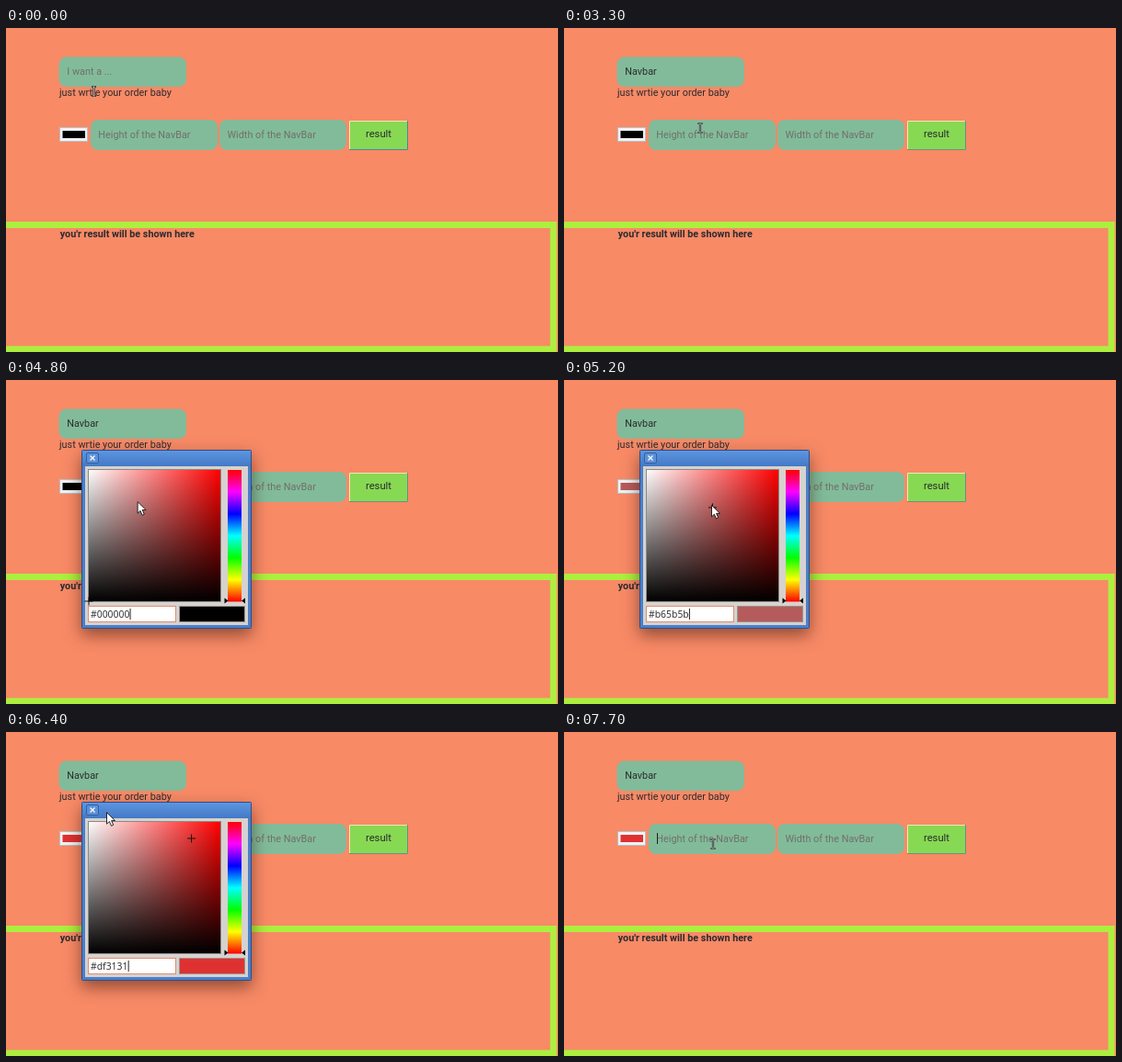
Animation, 600 px wide and 353 px high, one loop 8 s. Source, as an HTML page:

```html
<!DOCTYPE html>
<html lang="en">
<head>
<meta charset="utf-8">
<title>Order form</title>
<style>
  html, body { margin: 0; width: 100%; height: 100%; overflow: hidden; background: #f88a66; }
  svg { display: block; width: 600px; height: 353px; }
  text { font: 10.85px Roboto, sans-serif; fill: #2b2b30; white-space: pre; }
  .hint { fill: #70706a; }
  .field { fill: #82bb9a; }
  .caret { stroke: #222; stroke-width: 1; }
  #hex { font: 10.4px "Noto Sans", sans-serif; fill: #333; }
  #dialog { transform-origin: 174.5px 173.5px; }
  .shadow { filter: drop-shadow(0 7px 9px rgba(40, 10, 0, .5)); }
</style>
</head>
<body>
<svg viewBox="0 0 600 353">
  <defs>
    <linearGradient id="bar" x2="0" y2="1"><stop stop-color="#5e95e0"/><stop offset="1" stop-color="#4379c6"/></linearGradient>
    <linearGradient id="sat"><stop stop-color="#fff"/><stop offset="1" stop-color="#f00"/></linearGradient>
    <linearGradient id="val" x2="0" y2="1"><stop stop-opacity="0"/><stop offset="1"/></linearGradient>
    <linearGradient id="hue" x2="0" y2="1"></linearGradient>
  </defs>
  <rect width="600" height="353" fill="#f88a66"/>
  <rect x="-10" y="214.5" width="605" height="135.5" fill="none" stroke="#adef3f" stroke-width="7"/>

  <rect class="field" x="57.5" y="31.5" width="138.5" height="32.5" rx="8"/>
  <rect class="field" x="92" y="100" width="138" height="33" rx="8"/>
  <rect class="field" x="232" y="100" width="138" height="33" rx="8"/>
  <text id="order" x="66.3" y="51"></text>
  <path id="orderCaret" class="caret"/>
  <text x="58" y="74">just wrtie your order baby</text>
  <text class="hint" x="100.3" y="119.5">Height of the NavBar</text>
  <text class="hint" x="240.5" y="119.5">Width of the NavBar</text>
  <path id="heightCaret" class="caret" d="M101.5 110v12"/>

  <rect x="58.5" y="108.5" width="30" height="15" fill="#f0f1f3" stroke="#b9bfc4"/>
  <rect class="picked" x="61.5" y="112" width="24.5" height="8"/>

  <rect x="373" y="101" width="64" height="32" fill="#87d953"/>
  <path d="M373.5 133V101.5H437" fill="none" stroke="#f3e7b8"/>
  <path d="M373 132.5H436.5V101" fill="none" stroke="#6c8f87"/>
  <path id="focus" d="M374 132.5H436.5V101" fill="none" stroke="#3d6fd0" stroke-dasharray="1 1"/>
  <text x="391" y="119" style="font-size:11.2px">result</text>
  <text x="58.7" y="228" style="font-size:10.8px;font-weight:600">you'r result will be shown here</text>

  <g id="dialog">
    <rect x="82.5" y="76.5" width="184" height="194" rx="1" fill="#4a7fca" stroke="#2c4f88"/>
    <rect x="83" y="77" width="183" height="17" fill="url(#bar)"/>
    <rect id="close" x="87.5" y="79.5" width="13" height="11" rx="1.5" stroke="#355f9f"/>
    <path d="M91.5 82.5l5 5m0-5l-5 5" stroke="#fff" stroke-width="1.2"/>
    <rect x="86" y="94" width="177" height="173" fill="#d6d2cf"/>
    <rect x="89.5" y="97.5" width="144" height="144" fill="url(#sat)"/>
    <rect x="89.5" y="97.5" width="144" height="144" fill="url(#val)" stroke="#8d8985"/>
    <path id="cross" d="M-4.5 0h9M0-4.5v9" stroke="#111"/>
    <rect x="241" y="98" width="15" height="143.5" fill="url(#hue)"/>
    <path d="M237.5 237.5l4 3-4 3zM260 237.5l-4 3 4 3z"/>
    <rect x="89.5" y="246.5" width="95" height="17" fill="#fff" stroke="#dd8d72"/>
    <rect class="picked" x="188.5" y="246.5" width="71" height="17" stroke="#99938f"/>
    <text id="hex" x="92" y="259"></text>
    <path id="hexCaret" class="caret"/>
  </g>

  <g id="beam" fill="none">
    <path d="M-2.5-5h5M0-5v10M-2.5 5h5" stroke="#222" stroke-width="2.2"/>
    <path d="M-2-5h4M0-5v10M-2 5h4" stroke="#ddd" stroke-width=".7"/>
  </g>
  <path id="arrow" d="M0 0V12.5L2.9 9.8 5 14.6 7.2 13.6 5.1 8.9H9Z" fill="#fff" stroke="#111" stroke-width=".9"/>
</svg>
<script>
const $ = id => document.getElementById(id);
const show = (id, on) => $(id).style.display = on ? '' : 'none';
const move = (id, x, y) => $(id).setAttribute('transform', `translate(${x} ${y})`);
const clamp = (v, max = 1) => Math.max(0, Math.min(max, v));
const easeOut = p => 1 - (1 - p) ** 3;
const smooth = p => p * p * (3 - 2 * p);

$('hue').innerHTML = [...'0123456']
  .map(i => `<stop offset="${i / 6}" stop-color="hsl(${360 - i * 60} 100% 50%)"/>`).join('');

// Pointer moves: start, duration, x, y
const pressed = 5100, released = 6100;
const moves = [
  [0, 100, 84, 50], [500, 200, 62, 40], [800, 100, 70, 50],
  [2900, 400, 148, 109], [3600, 500, 80, 119],
  [4600, 500, 160.5, 136.44], [5300, 700, 200.58, 113.45],
  [released, 600, 96.5, 84], [6900, 500, 162, 122]];

function pointer(t) {
  return moves.reduce(([x, y], [start, time, toX, toY]) => {
    const p = easeOut(clamp((t - start) / time));
    return [x + (toX - x) * p, y + (toY - y) * p];
  }, [95.5, 69]);
}

// The crosshair follows the pointer while dragging; its place gives the colour
function pick(t) {
  if (t < pressed) return [0, 0];
  const [x, y] = pointer(Math.min(t, released));
  return [(x - 89) / 143, 1 - (y - 95.5) / 143];
}

function toHex(s, v) {
  const pair = n => Math.round(255 * n).toString(16).padStart(2, '0');
  return '#' + pair(v) + pair(v * (1 - s)).repeat(2);
}

function drawForm(t) {
  const typed = t < 1300 ? 0 : 1 + clamp(Math.floor((t - 1625) / 175), 5);
  const order = $('order');
  order.textContent = typed ? 'Navbar'.slice(0, typed) : 'I want a ...';
  order.setAttribute('class', typed ? '' : 'hint');
  const end = typed ? order.getComputedTextLength() : 0;
  $('orderCaret').setAttribute('d', `M${67 + end} 41v12`);
  show('orderCaret', t >= 700 && t < 3000);
  show('heightCaret', t >= 7600);
  show('focus', t < 100);
}

function drawDialog(t, [s, v], color) {
  const alpha = smooth(clamp((t - 4300) / 400)) - smooth(clamp((t - 6800) / 400));
  show('dialog', alpha > 0);
  if (!alpha) return;
  const dialog = $('dialog');
  dialog.style.opacity = alpha;
  dialog.style.transform = `scale(${.94 + .06 * alpha})`;
  dialog.setAttribute('class', t > 6800 ? '' : 'shadow');
  move('cross', 90 + 143 * s, 98 + 143 * (1 - v));
  $('close').setAttribute('fill', t >= 6700 ? '#3c5f94' : '#5c91da');
  $('hex').textContent = color;
  $('hexCaret').setAttribute('d', `M${92.7 + $('hex').getComputedTextLength()} 249v12`);
  show('hexCaret', t < 6500);
}

function draw(t) {
  const picked = pick(t), color = toHex(...picked);
  document.querySelectorAll('.picked').forEach(e => e.setAttribute('fill', color));
  drawForm(t);
  drawDialog(t, picked, color);

  const beam = t < 3800 || t >= 7200;
  show('beam', beam && (t < 1300 || t >= 3000));
  show('arrow', !beam);
  move(beam ? 'beam' : 'arrow', ...pointer(t));
}

// The picture advances in steps of 100 ms
let last = -1;
function tick() {
  const t = Math.floor(performance.now() % 8000 / 100) * 100;
  if (t !== last) draw(last = t);
  requestAnimationFrame(tick);
}
tick();
</script>
</body>
</html>
```
